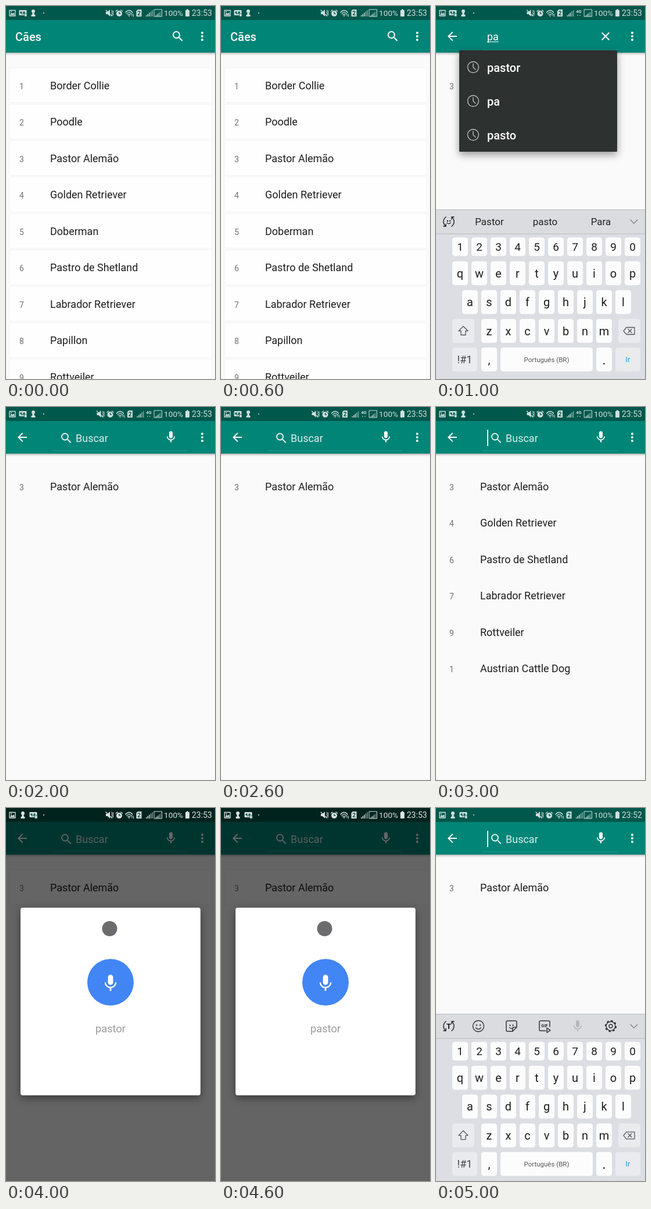
Recreate the animation shown at these times as an HTML page. Size 360x640 px, loop 6 s.

```html
<!DOCTYPE html>
<html lang="pt-BR">
<head>
<meta charset="utf-8">
<title>Cães</title>
<style>
  html, body { margin: 0; width: 100%; height: 100%; overflow: hidden; background: #fafafa; }
  svg { display: block; width: 360px; height: 640px; font-family: Roboto, sans-serif; }
  .line { fill: none; stroke: currentColor; stroke-width: 1.5; stroke-linecap: round; stroke-linejoin: round; }
  .bar { filter: drop-shadow(0 1px 2px rgba(0, 0, 0, .4)); }
  .popup { filter: drop-shadow(0 5px 7px rgba(0, 0, 0, .4)); }
</style>
</head>
<body>
<svg id="stage" viewBox="0 0 360 640"></svg>
<script>
const STATUS = '#00574b', APP = '#008577', PALE = '#cfe0dd', INK = '#1d1d1d';

const ICONS = {
  search: 'M15.5 14h-.79l-.28-.27A6.47 6.47 0 0 0 16 9.5 6.5 6.5 0 1 0 9.5 16c1.61 0 3.09-.59 4.23-1.57l.27.28v.79l5 4.99L20.49 19l-4.99-5zm-6 0a4.5 4.5 0 1 1 0-9 4.5 4.5 0 0 1 0 9z',
  back: 'M20 11H7.83l5.59-5.59L12 4l-8 8 8 8 1.41-1.41L7.83 13H20v-2z',
  close: 'M19 6.41L17.59 5 12 10.59 6.41 5 5 6.41 10.59 12 5 17.59 6.41 19 12 13.41 17.59 19 19 17.59 13.41 12z',
  mic: 'M12 14c1.66 0 3-1.34 3-3V5a3 3 0 0 0-6 0v6c0 1.66 1.34 3 3 3zm5.3-3c0 3-2.54 5.1-5.3 5.1S6.7 14 6.7 11H5c0 3.41 2.72 6.23 6 6.72V21h2v-3.28c3.28-.48 6-3.3 6-6.72h-1.7z'
};

const DOGS = ['Border Collie', 'Poodle', 'Pastor Alemão', 'Golden Retriever', 'Doberman',
  'Pastro de Shetland', 'Labrador Retriever', 'Papillon', 'Rottveiler'].map((name, i) => [i + 1, name]);
const SHEPHERD = [DOGS[2]];
const MATCHES = [3, 4, 6, 7, 9].map(n => DOGS[n - 1]).concat([[1, 'Austrian Cattle Dog']]);

// Drawing helpers
const rect = (x, y, w, h, fill, extra = '') =>
  `<rect x="${x}" y="${y}" width="${w}" height="${h}" fill="${fill}" ${extra}/>`;
const circle = (x, y, r, fill, extra = '') => `<circle cx="${x}" cy="${y}" r="${r}" fill="${fill}" ${extra}/>`;
const path = (d, fill = 'currentColor') => `<path d="${d}" fill="${fill}"/>`;
const line = (d, width = 1.5) => `<path class="line" d="${d}" style="stroke-width:${width}"/>`;
const text = (x, y, size, fill, str, extra = '') =>
  `<text x="${x}" y="${y}" font-size="${size}" fill="${fill}" ${extra}>${str}</text>`;
const label = (x, y, size, fill, str, extra = '') => text(x, y, size, fill, str, `text-anchor="middle" ${extra}`);
const at = (x, y, body, color = INK) => `<g transform="translate(${x} ${y})" color="${color}">${body}</g>`;
const icon = (name, x, y, color = '#fff', scale = 1) =>
  `<path transform="translate(${x} ${y}) scale(${scale})" d="${ICONS[name]}" fill="${color}"/>`;

// Status bar
const picture = line('M-5-4.5H5V5H-5z', 1.3) + path('M-4 3.5l2.5-4 2 2 2-2.5L4 3.5z') + circle(-2, -2, 1, 'currentColor');
const tape = rect(-6.5, -5, 13, 9, 'currentColor', 'rx="1"') + circle(-3, -1, 1.8, STATUS) + circle(2, -1, 1.8, STATUS) +
  path('M-3 1h5v1h-5z', STATUS) + rect(2.5, 1, 4.5, 5, 'currentColor', `stroke="${STATUS}" stroke-width=".8"`);
const keyhole = circle(0, -3, 3, 'currentColor') + path('M-1.3-1h2.6L2 3h1.5v3h-7V3H-2z');
const mute = path('M-6-2h3l4-4V6l-4-4h-3z') + line('M-6-5L4 5', 1.3) + line('M4-5l1 2-1 2 1 2-1 2 1 2M6.5-4v8', 1);
const alarm = circle(0, 1, 5, 'currentColor') + line('M-5.5-3l2.5-2M5.5-3L3-5') +
  `<path d="M0-2v3h2.5" fill="none" stroke="${STATUS}" stroke-width="1.3"/>`;
const wifi = line('M-7-1Q-1-8 5-1M-5 1.3Q-1-3.5 3 1.3M-3 3.3Q-1 1 1 3.3', 1.3) + circle(-1, 5, 1, 'currentColor') +
  line('M4 5V1M6.5 2v4', 1);
const sim = path('M-4.5-3.5l2.5-2.5h6.5V6h-9z') + label(0, 4, 10, STATUS, '2', 'font-weight="700"');
const bars = [0, 1, 2, 3, 4].map(i =>
  rect(-6 + i * 2.6, 4 - i * 2.2, 1.4, 2 + i * 2.2, 'currentColor', i > 2 ? 'opacity=".65"' : '')).join('');
const boxedBars = line('M-6.5-6H6.5V6H-6.5z', 1) + `<g transform="translate(0 1.2) scale(.75)">${bars}</g>`;

function statusBar({ swapped, mobile, clock = '23:53', color = PALE }) {
  const shift = mobile ? -15.5 : 0;
  const parts = [[11, picture], [swapped ? 47 : 29, tape], [swapped ? 29 : 47, keyhole],
    [178 + shift, mute], [195 + shift, alarm], [213 + shift, wifi], [229 + shift, sim],
    [247 + shift, bars], [262, boxedBars]];
  return parts.map(([x, body]) => at(x, 12, body, color)).join('') + circle(65, 12, 1, color) +
    (mobile ? label(246, 12, 7.5, color, '4G', 'font-weight="700"') + at(246, 16, path('M-3-1h2v2h-2zM1-1h2v2H1z'), '#6f9b94') : '') +
    text(272, 17, 13.7, color, '100%') + rect(309, 7, 7, 11, color, 'rx="1"') + rect(311, 5.5, 3, 2, color) +
    text(320, 17, 14, color, clock);
}

// App bar and list
const appBar = body => `<g class="bar">${rect(-5, 24, 370, 56, APP)}</g>` + rect(0, 0, 360, 24, STATUS) + body +
  [46, 52, 58].map(y => circle(338, y, 2, '#fff')).join('');
const fieldLine = rect(80, 74.5, 232, 1, '#2b998d');
const searchBar = cursor => appBar(icon('back', 16, 40) + fieldLine + icon('search', 92, 41.5, '#e4f2f0') +
  text(120, 60, 18, '#d9edeb', 'Buscar') + icon('mic', 272, 39.5) + (cursor ? rect(88, 39, 2, 28, '#fff') : ''));

const list = (dogs, cards) => dogs.map(([number, name], i) => {
  const y = 62.5 * i;
  return (cards ? rect(6, 106 + y, 349, 59.5, '#fefefe', 'rx="2" stroke="#f3f3f3"') : '') +
    text(23, 142.7 + y, 14, '#737373', number) + text(76, 142.5 + y, 18, INK, name);
}).join('');

// Keyboard
const turnArrows = line('M-5-8A10 10 0 0 0-5 8M-5 8v-4M-5 8h-4M5 8A10 10 0 0 0 5-8M5-8v4M5-8h4', 1.4);
const smile = r => circle(-r * .35, -r * .2, 1.2, 'currentColor') + circle(r * .35, -r * .2, 1.2, 'currentColor') +
  line(`M${-r * .5} ${r * .3}Q0 ${r * .9} ${r * .5} ${r * .3}`, 1.3);
const ring = r => circle(0, 0, r, 'none', 'stroke="currentColor" stroke-width="1.4"');
const face = ring(9.5) + smile(9);
const sticker = line('M-7-9H7Q9-9 9-7V2L2 9H-7Q-9 9-9 7V-7Q-9-9-7-9M9 2H4Q2 2 2 4V9') + smile(7);
const gif = line('M9 1V-7Q9-9 7-9H-7Q-9-9-9-7V6Q-9 8-7 8H2M4 3l6 4-6 4z') +
  label(0, 1.5, 7.5, 'currentColor', 'GIF', 'font-weight="700"');
const gear = ring(7.8) + ring(3) +
  circle(0, 0, 9, 'none', 'stroke="currentColor" stroke-width="2.4" pathLength="16" stroke-dasharray="1"');
const chevron = at(341, 0, line('M-6-3L0 3 6-3', 1.2), '#777');

const key = (x, y, w, h, str, size = 20, special = false, color = INK) =>
  rect(x, y, w, h, special ? '#e9ebee' : '#fcfcfd', 'rx="4.5"') +
  label(x + w / 2, y + h / 2 + size * .35, size, color, str);
const keyRow = (chars, x, y, h, size) => [...chars].map((c, i) => key(x + 33 * i, y, 27, h, c, size)).join('');

const keyboard = (top, tools) => at(0, top,
  rect(0, 0, 360, 300, '#dcdee3') + rect(-1, .5, 362, 41.5, '#dbdcdf', 'stroke="#b4b7bb"') + at(0, 21, tools + chevron) +
  keyRow('1234567890', 28, 48, 32, 19) + keyRow('qwertyuiop', 28, 89, 41, 20) +
  keyRow('asdfghjkl', 45, 138.5, 41, 20) + keyRow('zxcvbnm', 78, 188, 41, 20) +
  key(28, 188, 38, 41, '', 20, true) + at(47, 208.5, line('M0-8L8 0H4V7H-4V0H-8z', 1.3), '#555') +
  key(314, 188, 38, 41, '', 20, true) +
  at(333, 208.5, line('M-10 0L-5-6H9V6H-5zM-2-3L4 3M4-3L-2 3', 1.3), '#555') +
  key(28, 237, 43, 41, '!#1', 18, true, '#444') + key(78, 237, 27, 41, ',') +
  key(111, 237, 159, 41, 'Português (BR)', 11.5, false, '#555') +
  key(276, 237, 27, 41, '.', 24) + key(309, 237, 43, 41, 'Ir', 13, true, '#3596cf'));

const wordTools = at(22, 0, turnArrows + smile(6)) +
  ['Pastor', 'pasto', 'Para'].map((word, i) => label(92 + 96 * i, 6, 17, '#222', word)).join('');
const iconTools = at(22, 0, turnArrows + label(0, 5, 13, INK, 'T', 'font-weight="700"')) +
  [face, sticker, gif].map((body, i) => at(73 + 57 * i, 0, body, '#333')).join('') +
  icon('mic', 232, -12, '#b4b6ba') + at(301, 0, gear, '#333');

const suggestions = `<g class="popup">${rect(40, 76, 272, 174, '#2d3130', 'rx="1.5"')}</g>` +
  ['pastor', 'pa', 'pasto'].map((word, i) =>
    at(64, 105 + 58 * i, ring(9.5) + line('M0-6V0L4 4', 1.4), '#b9bcbb') +
    text(88, 113 + 58 * i, 20, '#fff', word, 'font-weight="500"')).join('');

const voiceDialog = `<g class="popup">${rect(25, 171, 310, 322, '#fff', 'rx="4"')}</g>` +
  circle(178.5, 207, 13, '#6c6c6f') + circle(180, 299, 40, '#4285f4') +
  icon('mic', 162.4, 283, '#fff', 1.47) + label(180, 385, 18.3, '#9b9b9b', 'pastor');

const scenes = [
  list(DOGS, true) + appBar(text(16, 60, 20, '#fff', 'Cães', 'font-weight="500"') + icon('search', 284, 40)) + statusBar({}),
  list(SHEPHERD) + appBar(icon('back', 16, 40) + fieldLine + text(88, 59, 18, '#fff', 'pa') +
    rect(88, 61, 20, 1, '#fff') + icon('close', 280, 40)) +
    suggestions + keyboard(349, wordTools) + statusBar({ mobile: true }),
  list(SHEPHERD) + searchBar(false) + statusBar({ mobile: true }),
  list(MATCHES) + searchBar(true) + statusBar({ mobile: true }),
  list(SHEPHERD, true) + searchBar(false) + rect(0, 0, 360, 640, '#000', 'opacity=".6"') +
    voiceDialog + statusBar({ swapped: true, color: '#dce3e2' }),
  list(SHEPHERD) + searchBar(true) + keyboard(353.3, iconTools) + statusBar({ swapped: true, clock: '23:52' })
];

const stage = document.getElementById('stage');
stage.innerHTML = scenes.map(body => `<g display="none">${rect(0, 0, 360, 640, '#fafafa')}${body}</g>`).join('');

const start = performance.now();
let shown = -1;
function draw() {
  const index = Math.floor((performance.now() - start) / 1000) % scenes.length;
  if (index !== shown) {
    [...stage.children].forEach((scene, i) => scene.setAttribute('display', i === index ? 'inline' : 'none'));
    shown = index;
  }
  requestAnimationFrame(draw);
}
draw();
</script>
</body>
</html>
```
